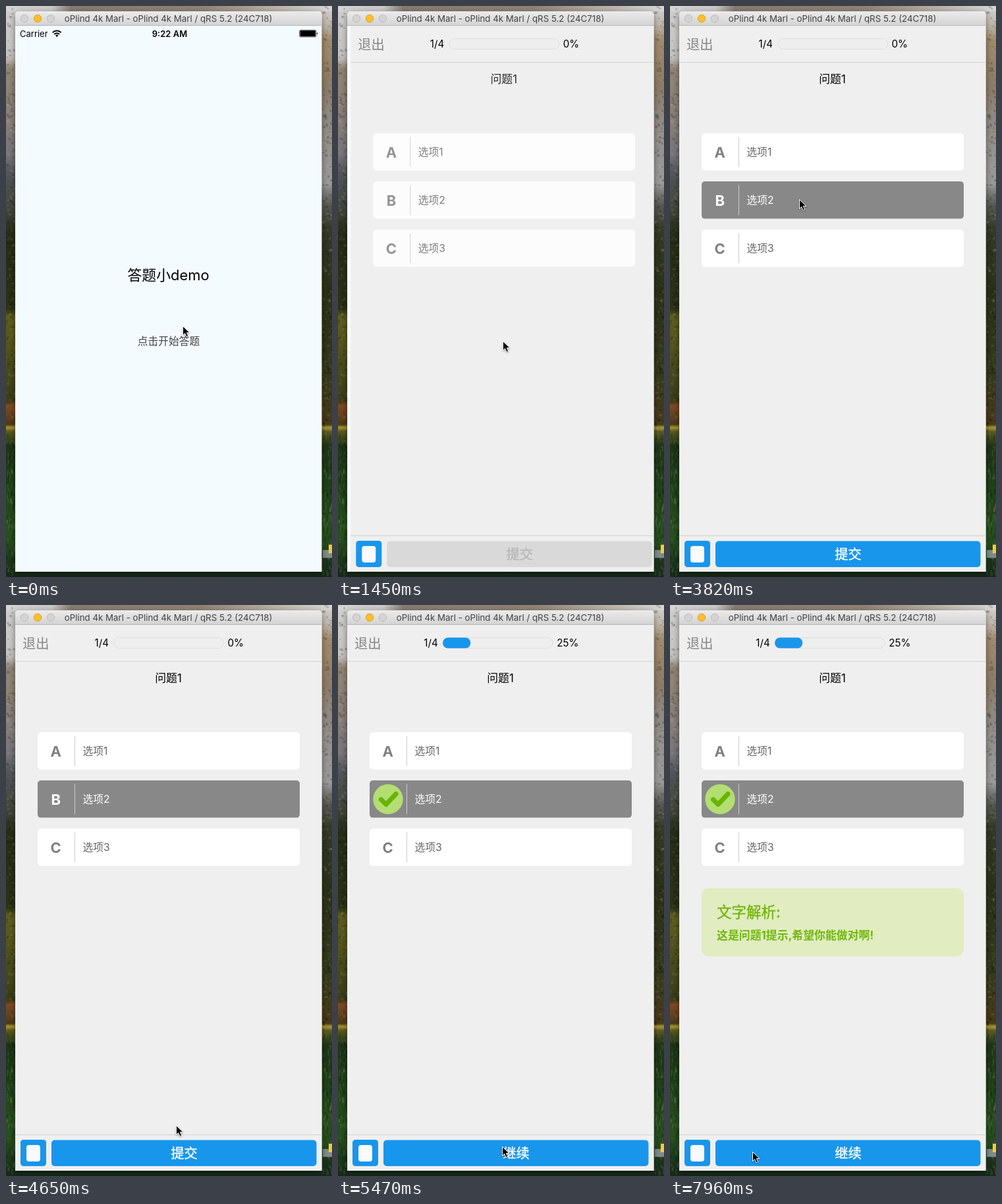
Write an HTML page with a canvas that moves like this. It is 495 px wide and 866 px high and loops after 8 s.

```html
<!DOCTYPE html>
<html lang="zh-CN">
<head>
<meta charset="utf-8">
<title>Quiz demo</title>
<style>
  html, body { margin: 0; width: 100%; height: 100%; overflow: hidden; background: #2a3a1c; }
  canvas, svg { position: absolute; left: 0; top: 0; width: 495px; height: 866px; display: block; }
  text { font-family: Inter, "Noto Sans CJK SC", "Noto Sans CJK", sans-serif; white-space: pre; }
  .win { filter: drop-shadow(0 3px 5px rgba(0, 0, 0, .45)); }
  .mid { text-anchor: middle; }
  .end { text-anchor: end; }
  .medium { font-weight: 500; stroke: currentColor; stroke-width: .4px; }
</style>
</head>
<body>
<canvas id="bg" width="495" height="866"></canvas>
<svg viewBox="0 0 495 866">
  <defs>
    <linearGradient id="bar" x2="0" y2="1">
      <stop stop-color="#ebebeb"/><stop offset="1" stop-color="#d3d3d3"/>
    </linearGradient>
    <clipPath id="screen"><rect x="14" y="30" width="465.5" height="828"/></clipPath>
  </defs>

  <path class="win" fill="#f4fbff" d="M14 858V13a5 5 0 0 1 5-5H474.500a5 5 0 0 1 5 5V858z"/>
  <path fill="url(#bar)" d="M14 30V13a5 5 0 0 1 5-5H474.500a5 5 0 0 1 5 5V30z"/>
  <path stroke="#b4b4b4" d="M14 29.500H479.500"/>
  <g fill="#d4d4d4" stroke="#bcbcbc">
    <circle cx="28" cy="19" r="5.700"/>
    <circle cx="48" cy="19" r="5.700" fill="#fdbe2f" stroke="#e0a023"/>
    <circle cx="68" cy="19" r="5.700"/>
  </g>
  <text class="mid" x="246.500" y="24" font-size="13.300" fill="#424242">oPlind 4k Marl - oPlind 4k Marl / qRS 5.2 (24C718)</text>

  <g clip-path="url(#screen)">
    <g id="status">
      <text x="21" y="46.500" font-size="13">Carrier</text>
      <g fill="none" stroke="#000" stroke-width="2">
        <path d="M70.800 40.200a9 9 0 0 1 12.800 0M73.300 42.800a5.500 5.500 0 0 1 7.800 0"/>
      </g>
      <path d="M77.200 47l-2.300-2.500a3.300 3.300 0 0 1 4.600 0z"/>
      <text class="mid" x="248.500" y="46.500" font-size="13" font-weight="600">9:22 AM</text>
      <rect x="445.500" y="36.500" width="25.500" height="10.500" rx="2" fill="none" stroke="#000" stroke-width=".6"/>
      <rect x="446.500" y="37.300" width="23.500" height="8.900" rx="1"/>
      <path d="M472 39.800q2.200 2 0 4z"/>
    </g>
    <g id="labels">
      <text class="mid" x="246.500" y="416" font-size="21.900">答题小demo</text>
      <text class="mid" x="247" y="514" font-size="15.760" fill="#444">点击开始答题</text>
    </g>

    <g id="page">
      <rect x="14" y="30" width="466" height="828" fill="#efefef"/>
      <path stroke="#d2d2d2" d="M14 85.500H480M14 803.500H480"/>
      <text x="25" y="65.500" font-size="20.260" fill="#858585">退出</text>
      <g id="meter">
        <text class="end" x="156" y="63" font-size="15.200">1/4</text>
        <rect x="163.500" y="49.500" width="167" height="16" rx="8" fill="#eee" stroke="#dcdcdc"/>
        <rect id="fill" x="163.500" y="49.500" height="16" rx="7.500" fill="#1896ec"/>
        <text id="pct" x="336.500" y="63" font-size="15.200">0%</text>
      </g>

      <g id="quiz">
        <text class="mid" x="246.500" y="116.500" font-size="16.900">问题1</text>
        <g id="rows"></g>
        <g id="tick">
          <circle cx="76" cy="294.500" r="22.700" fill="#b3de72"/>
          <path d="M65.500 295l7.500 7.500L88 286.500" fill="none" stroke="#68b400" stroke-width="7" stroke-linecap="round" stroke-linejoin="round"/>
        </g>
      </g>

      <g id="hint" fill="#70b70c" color="#70b70c">
        <rect x="48" y="429.500" width="398" height="103.500" rx="11" fill="#e1ecc0"/>
        <text class="medium" x="71" y="474" font-size="22.500">文字解析:</text>
        <text x="71" y="506.500" font-size="16.900" font-weight="700">这是问题1提示,希望你能做对啊!</text>
      </g>

      <g id="note">
        <rect x="22" y="811" width="39" height="40" rx="4.500" fill="#1896ec"/>
        <rect x="31" y="819" width="21" height="25" rx="4" fill="#fafafa"/>
      </g>
      <g id="send">
        <rect id="sendBg" x="69" y="811.500" width="402.500" height="39.500" rx="5"/>
        <text id="sendText" class="mid medium" x="270.500" y="838.800" font-size="20.260" fill="currentColor"></text>
      </g>
    </g>
  </g>

  <g id="cursor">
    <circle id="ring" cx="2" cy="1" r="10" fill="#fff" fill-opacity=".85" stroke="#000" stroke-width="1.300"/>
    <path d="M.500 .5V14.500l3.200-3 2.300 5.300 2.700-1.200-2.300-5.100H11z" fill="#000" stroke="#fff" stroke-linejoin="round" style="filter:drop-shadow(0 1px 1px rgba(0,0,0,.4))"/>
  </g>
</svg>

<script>
const LOOP = 8000;
const $ = id => document.getElementById(id);
const set = (id, attrs) => {
  for (const k in attrs) $(id).setAttribute(k, attrs[k]);
};
const show = (id, alpha) => set(id, { opacity: alpha });
const clamp = v => Math.max(0, Math.min(1, v));
const span = (t, a, b) => clamp((t - a) / (b - a));
const easeOut = p => 1 - (1 - p) ** 2;
const easeInOut = p => p < .5 ? 2 * p * p : 1 - 2 * (1 - p) ** 2;

// Screen updates: [first, last, count]
const ticks = [0, ...[
  [120, 830, 7], [940, 1300, 4], [1450, 1680, 3], [2040, 2380, 4], [3700, 4290, 6],
  [4530, 4880, 4], [5120, 5470, 4], [5950, 6650, 7], [6770, 7010, 3], [7720, 7960, 3]
].flatMap(([a, b, n]) =>
  Array.from({ length: n }, (_, i) => Math.round((a + (b - a) * i / (n - 1)) / 10) * 10))];

// Pointer moves: [from, to, x, y]
const moves = [
  [60, 480, 250, 508], [1960, 2380, 196, 293], [3850, 4290, 264, 687], [4410, 4650, 258, 789],
  [4650, 4880, 249, 821], [5860, 6540, 37, 825], [7630, 7960, 125, 829]
];
const presses = [[590, 710], [3700, 3820], [5120, 5240], [6650, 6770]];
const pressed = (t, i) => t >= presses[i][0] && t < presses[i][1];

function pointer(t) {
  let x = 268, y = 485;
  for (const [a, b, tx, ty] of moves) {
    const p = easeOut(span(t, a, b));
    x += (tx - x) * p;
    y += (ty - y) * p;
  }
  return [x, y];
}

// Critically damped push from the right
function pushOffset(t) {
  const s = Math.max(0, t - 742) * .00917;
  return t > 1640 ? 0 : 466 * (1 + s) * Math.exp(-s);
}

$('rows').innerHTML = ['A', 'B', 'C'].map((c, i) => `
  <g transform="translate(0 ${i * 73.1})">
    <rect id="bg${c}" x="48" y="193" width="398" height="56.500" rx="5" fill="#fff"/>
    <path stroke="#ccc" d="M104.500 198.500V244"/>
    <text id="key${c}" class="mid" x="75.700" y="229.500" font-size="22" font-weight="700" fill="#808080">${c}</text>
    <text id="opt${c}" x="116.500" y="227.300" font-size="15.760" fill="#666">选项${i + 1}</text>
  </g>`).join('');

function render(time) {
  const t = ticks.filter(k => k <= time).pop();
  const chosen = t >= 3820, done = t >= 5240;

  show('status', t < 710 ? 1 : 0);
  show('labels', 1 - span(t, 590, 830));
  set('page', { transform: `translate(${pushOffset(t)} 0)` });
  show('quiz', easeInOut(span(t, 900, 1680)));

  set('bgB', { fill: chosen ? '#888' : '#fff' });
  set('keyB', { fill: chosen ? '#fff' : '#808080', opacity: done ? 0 : 1 });
  set('optB', { fill: chosen ? '#fff' : '#666' });
  show('tick', done ? 1 : 0);

  set('meter', { transform: `translate(${done ? -4.3 : 0} 0)` });
  set('fill', { width: 42 * easeOut(span(t, 5150, 5470)) * done });
  $('pct').textContent = done ? '25%' : '0%';

  set('sendBg', { fill: chosen ? '#1896ec' : '#d9d9d9' });
  set('sendText', { color: chosen ? '#fff' : '#b8b8b8' });
  $('sendText').textContent = done ? '继续' : '提交';
  show('send', pressed(t, 2) ? .5 : 1);
  show('note', pressed(t, 3) ? .5 : 1);
  show('hint', easeInOut(span(t, 6660, 7010)));

  set('cursor', { transform: `translate(${pointer(t)})` });
  show('ring', presses.some((_, i) => pressed(t, i)) ? 1 : 0);
}

// Soft landscape behind the window
function paintBackdrop() {
  const ctx = $('bg').getContext('2d');
  const strip = (x, y, w, h, stops, across) => {
    const g = ctx.createLinearGradient(x, y, across ? x + w : x, across ? y : y + h);
    stops.forEach(([p, c]) => g.addColorStop(p, c));
    ctx.fillStyle = g;
    ctx.fillRect(x, y, w, h);
  };
  const lake = [[.733, '#4a3a1a'], [.738, '#a8952f'], [.745, '#5a5a20'], [.77, '#1e3518'],
    [.85, '#1f4319'], [.93, '#28501f'], [1, '#16291a']];
  strip(0, 0, 248, 866, [[0, '#cfcfcf'], [.09, '#c4c2c0'], [.11, '#8f8476'], [.18, '#8a8078'],
    [.26, '#77757a'], [.29, '#54575c'], [.36, '#3f4438'], [.4, '#252c17'], [.53, '#2b3217'],
    [.545, '#5f5f20'], [.62, '#4c4d1c'], [.69, '#3a3d1a'], [.7, '#7c4a25'], ...lake]);
  strip(248, 0, 247, 866, [[0, '#cfcfce'], [.03, '#c2bab0'], [.06, '#a18a6c'], [.14, '#8d7b66'],
    [.2, '#8f8a84'], [.31, '#9a9a9a'], [.345, '#5b5d58'], [.39, '#343a25'], [.5, '#2a3018'],
    [.65, '#353a1c'], ...lake]);
  strip(0, 0, 495, 8, [[0, '#d5d5d5'], [.14, '#cbc9c6'], [.2, '#857b71'], [.6, '#8f8375'],
    [.8, '#b5aca1'], [1, '#d8d7d5']], true);

  let seed = 7;
  const rnd = () => (seed = seed * 16807 % 2147483647) / 2147483647;
  for (let i = 0; i < 900; i++) {
    const y = rnd() * 866;
    const x = rnd() < .5 ? rnd() * 14 : 479 + rnd() * 16;
    const wet = y > 645;
    ctx.fillStyle = rnd() < .5 ? 'rgba(10,12,8,.2)' : 'rgba(225,215,180,.1)';
    ctx.fillRect(x, y, wet ? 2 : 1 + rnd() * 4, wet ? 3 + rnd() * 8 : 1 + rnd() * 3);
  }
  ctx.fillStyle = '#7f8b8c';
  ctx.fillRect(481, 825, 14, 12);
  ctx.fillStyle = '#f0cf2c';
  ctx.fillRect(490, 817, 5, 13);
}

paintBackdrop();
const start = performance.now();
function loop() {
  render((performance.now() - start) % LOOP);
  requestAnimationFrame(loop);
}
loop();
</script>
</body>
</html>
```
